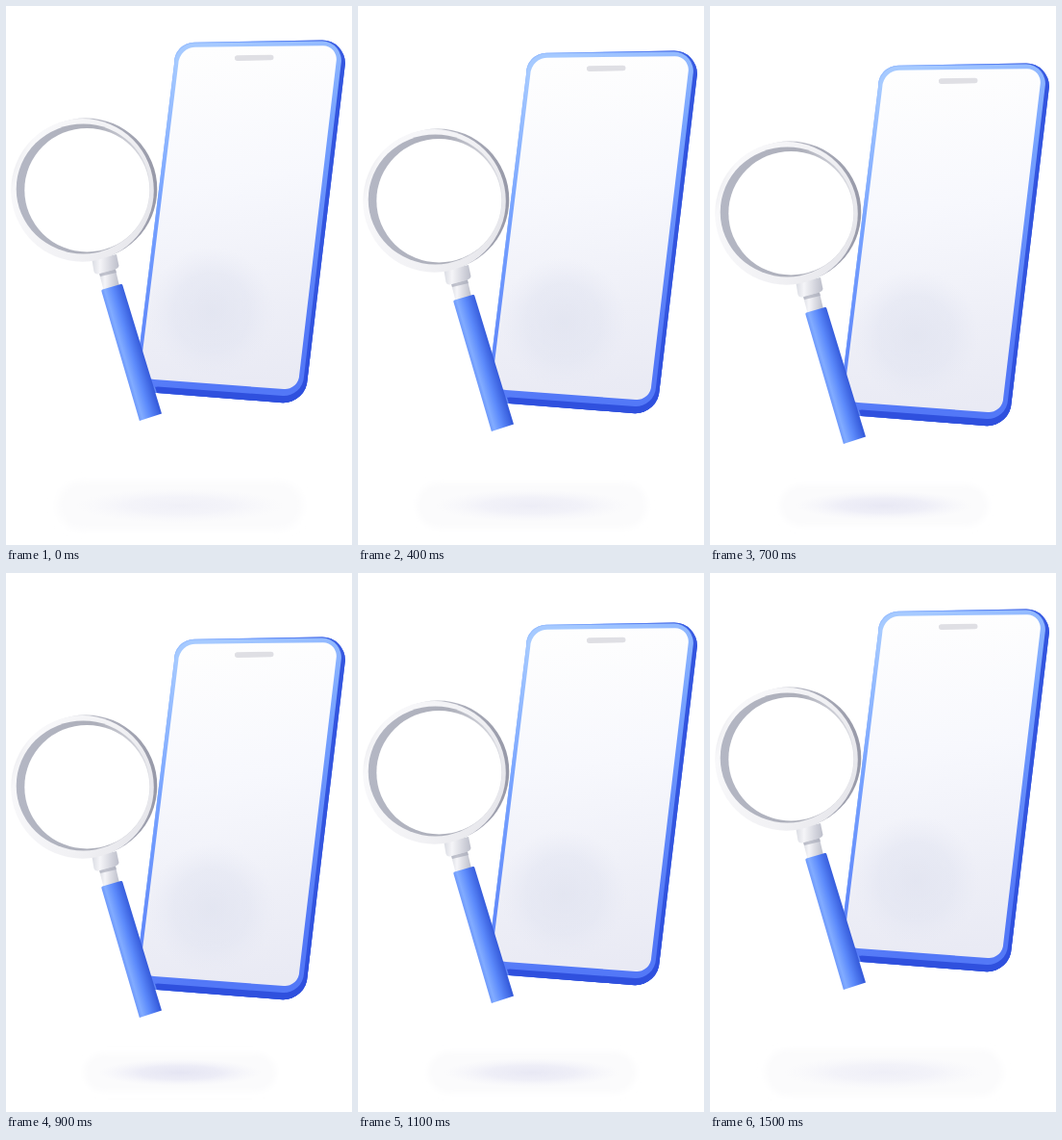
An HTML page for the animation above (1.6 s loop, 360x560 px).

```html
<!DOCTYPE html>
<html lang="en">
<head>
<meta charset="utf-8">
<title>Phone and magnifier</title>
<style>
  html, body { margin: 0; height: 100%; overflow: hidden; background: #fff; }
  svg { display: block; width: 360px; height: 560px; }
</style>
</head>
<body>
<svg viewBox="0 0 360 560">
  <defs>
    <linearGradient id="side" gradientUnits="userSpaceOnUse" x1="165" y1="60" x2="330" y2="120">
      <stop offset="0" stop-color="#9dc3ff"/>
      <stop offset=".5" stop-color="#6b95fa"/>
      <stop offset="1" stop-color="#3355df"/>
    </linearGradient>
    <linearGradient id="base" gradientUnits="userSpaceOnUse" x1="0" y1="300" x2="0" y2="412">
      <stop offset="0" stop-color="#2f50de" stop-opacity="0"/>
      <stop offset=".7" stop-color="#2f50de"/>
    </linearGradient>
    <linearGradient id="bezel" gradientUnits="userSpaceOnUse" x1="175" y1="60" x2="310" y2="340">
      <stop offset="0" stop-color="#a6caff"/>
      <stop offset=".4" stop-color="#76a2ff"/>
      <stop offset="1" stop-color="#5378f7"/>
    </linearGradient>
    <linearGradient id="screen" gradientUnits="userSpaceOnUse" x1="205" y1="45" x2="250" y2="395">
      <stop offset="0" stop-color="#fefefe"/>
      <stop offset=".4" stop-color="#f7f8fd"/>
      <stop offset=".75" stop-color="#eeeff7"/>
      <stop offset="1" stop-color="#e9eaf4"/>
    </linearGradient>
    <radialGradient id="glow">
      <stop offset="0" stop-color="#dfe2ef" stop-opacity=".7"/>
      <stop offset=".6" stop-color="#e1e4f1" stop-opacity=".5"/>
      <stop offset="1" stop-color="#e6e8f4" stop-opacity="0"/>
    </radialGradient>
    <linearGradient id="edge">
      <stop offset=".3" stop-color="#d5d6dd"/>
      <stop offset=".7" stop-color="#a9abb8"/>
      <stop offset="1" stop-color="#9799a8"/>
    </linearGradient>
    <linearGradient id="rim" x1="0" y1=".3" x2="1" y2=".7">
      <stop offset="0" stop-color="#e9e9ed"/>
      <stop offset=".08" stop-color="#f8f8fa"/>
      <stop offset=".6" stop-color="#f1f1f4"/>
      <stop offset="1" stop-color="#e6e6eb"/>
    </linearGradient>
    <linearGradient id="wall">
      <stop offset="0" stop-color="#b4b7c4"/>
      <stop offset=".6" stop-color="#adafba"/>
      <stop offset="1" stop-color="#dedfe5"/>
    </linearGradient>
    <linearGradient id="metal">
      <stop offset="0" stop-color="#dadce3"/>
      <stop offset=".3" stop-color="#f5f5f8"/>
      <stop offset="1" stop-color="#bcbeca"/>
    </linearGradient>
    <linearGradient id="grip">
      <stop offset="0" stop-color="#6d98fb"/>
      <stop offset=".15" stop-color="#82acff"/>
      <stop offset=".5" stop-color="#5c8afb"/>
      <stop offset="1" stop-color="#3257d8"/>
    </linearGradient>
    <radialGradient id="dusk">
      <stop offset="0" stop-color="#e3e3f2"/>
      <stop offset=".5" stop-color="#e6e6f4" stop-opacity=".75"/>
      <stop offset="1" stop-color="#efeff8" stop-opacity="0"/>
    </radialGradient>
    <filter id="soft" x="-20%" y="-60%" width="140%" height="220%">
      <feGaussianBlur stdDeviation="4"/>
    </filter>
  </defs>

  <g id="shadow">
    <rect x="-128" y="-25" width="256" height="50" rx="25" fill="#fbfbfc" filter="url(#soft)"/>
    <ellipse id="core" rx="108" ry="18" fill="url(#dusk)"/>
  </g>

  <g id="body">
    <g id="case">
      <path id="shell" fill="url(#side)" d="M196 37.8 L329 35.4 A24 24 0 0 1 352.9 60 L313.6 388 A25 25 0 0 1 288 412.2 L157 402 A20 20 0 0 1 136 378 L175 60 A21 21 0 0 1 196 37.8Z"/>
      <use href="#shell" style="fill:url(#base)"/>
      <path fill="url(#base)" d="M313.6 388 A25 25 0 0 1 288 412.2 L157 402 L150 380 L323 310Z"/>
      <path fill="url(#bezel)" d="M197 38.6 L329 36.6 A20 20 0 0 1 348.6 60 L310 385 A21 21 0 0 1 288 405 L158 395.500 A18 18 0 0 1 137 374 L175.500 60 A21 21 0 0 1 197 38.6Z"/>
    </g>
    <g id="display">
      <path fill="url(#screen)" d="M198 42.7 L330 41.2 A14 14 0 0 1 343.7 57 L305.2 383 A15 15 0 0 1 289 398 L154 388 A15 15 0 0 1 140.5 372 L179.300 60 A18 18 0 0 1 198 42.7Z"/>
      <ellipse cx="214" cy="318" rx="66" ry="68" fill="url(#glow)"/>
      <rect x="238" y="51" width="40.5" height="5.6" rx="2.8" fill="#dfdfe4" transform="rotate(-1 258 54)"/>
    </g>

    <path fill="url(#metal)" d="M96.5 276 L113.5 272 L118 291 L101.5 295Z"/>
    <path fill="#9fa2b1" opacity=".6" d="M97 277.5 L114 273.5 L115 277 L98 281Z"/>
    <path fill="url(#metal)" d="M89.5 264 L115 258 L117.5 270 Q117 272.500 114 273.500 L96 278.500 Q92.500 279 91.500 276Z"/>
    <path fill="url(#grip)" transform="translate(99 295) rotate(-16.35)" d="M0 1.500 Q0 0 1.500 0 L21.300 0 Q22.800 0 22.800 1.500 L24.300 141 L0 141.700Z"/>

    <ellipse cx="83" cy="190.200" rx="74.300" ry="73.700" fill="url(#edge)"/>
    <ellipse cx="79.500" cy="191.400" rx="74.300" ry="74.300" fill="url(#rim)"/>
    <ellipse cx="80.300" cy="190" rx="69.600" ry="67.500" fill="url(#wall)"/>
    <ellipse cx="84.300" cy="191.200" rx="65" ry="64.300" fill="#fff"/>
  </g>
</svg>
<script>
  const drop = [0, 6, 11, 16, 20, 24, 28, 31, 23, 16, 11, 7, 4, 2];
  const lowest = 7;
  const [body, shadow, core] = ["body", "shadow", "core"].map(id => document.getElementById(id));

  // The pose rests for 300 ms at the top, then changes every 100 ms.
  function draw(now) {
    const step = Math.max(0, Math.floor(now % 1600 / 100) - 2);
    const size = (102 + 4 * Math.abs(step - lowest)) / 130;
    body.setAttribute("transform", `translate(0 ${drop[step]})`);
    shadow.setAttribute("transform", `translate(181 519) scale(${size})`);
    core.setAttribute("opacity", 0.45 + 2.2 * (1 - size));
  }

  const start = performance.now();
  function tick() {
    draw(performance.now() - start);
    requestAnimationFrame(tick);
  }
  tick();
</script>
</body>
</html>
```
